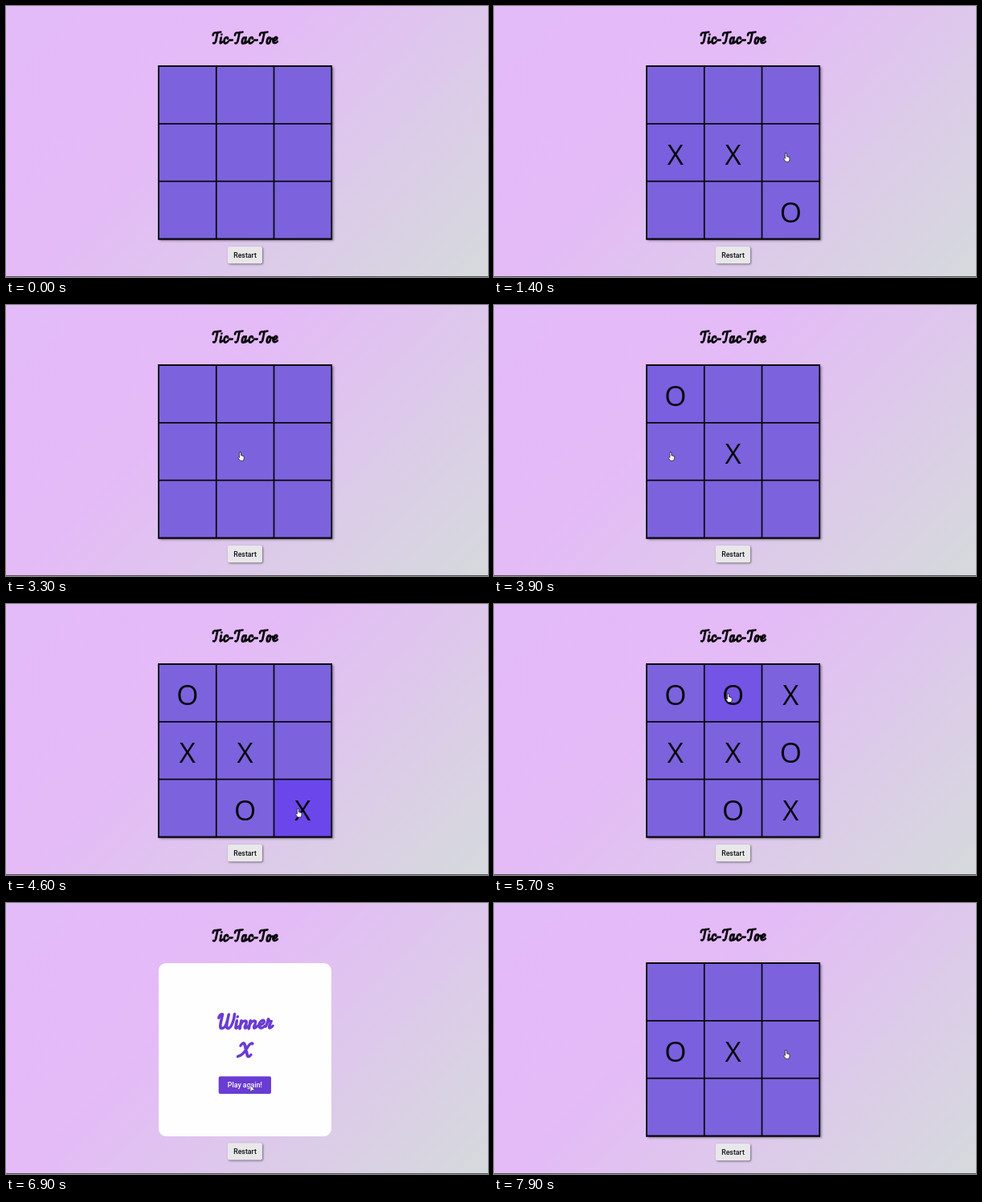
Animation of 600x338 px, one loop 8 s. Source, as an HTML page with a canvas:

```html
<!DOCTYPE html>
<html lang="en">
<head>
<meta charset="utf-8">
<title>Tic-Tac-Toe</title>
<style>
html, body { margin: 0; width: 100%; height: 100%; overflow: hidden; }
canvas { display: block; width: 600px; height: 338px; }
</style>
</head>
<body>
<canvas id="stage" width="600" height="338" role="img" aria-label="Tic-Tac-Toe game"></canvas>
<script>
const ctx = document.getElementById('stage').getContext('2d');
const LOOP = 8000, STEP = 100;
const BEAT = 320, REPLAY = 200, FLASH = 300, ENTER = 300;
const LEFT = 190, TOP = 75, PITCH = 71.75;
const INK = '#08060c', VIOLET = '#693cd3';

// Brush lettering: upright centre lines on a 100-unit em, slanted when drawn
const ring = (x, y, rx, ry) => `M${x - rx} ${y}a${rx} ${ry} 0 1 1 ${2 * rx} 0a${rx} ${ry} 0 1 1 ${-2 * rx} 0`;
const BOWL = ring(17, -21, 11, 21);
const GLYPHS = {
  T: 'M2-58Q0-76 16-75T50-79M30-76L28-14Q26 0 14-4',
  i: 'M8-62h.1M8-42V-12Q9 6 24-12',
  c: 'M28-34C22-50 4-44 6-20S24 2 34-13',
  '-': 'M4-24H24',
  a: BOWL + 'M28-42V-12Q30 4 44-14',
  o: BOWL + 'M24-36Q32-28 40-34',
  e: 'M6-18C44-24 28-56 12-38S14 12 36-13',
  W: 'M-2-56Q-2-78 14-74C14-40 6-2 24-2S46-40 46-74C46-40 40-2 56-2S80-50 76-76',
  n: 'M4 0V-42M4-20Q14-44 26-40T28-12Q30 6 46-14',
  r: 'M4-12Q12-36 10-50Q18-36 28-38L22-14Q24 6 40-14',
  X: 'M4-60Q14-84 26-62L46-14Q54 6 66-12M64-70Q52-78 38-44T0-4',
  O: ring(27, -34, 23, 32)
};
const ADVANCE = { T: 52, i: 27, c: 37, '-': 34, a: 47, o: 42, e: 38, W: 86, n: 47, r: 38 };

const HAND = new Path2D('M-1 0H1V4L4.6 5V8L3.8 10.6H-.2L-2.8 7L-2 6L-1 6.7Z');
const ARROW = new Path2D('M0 0V8.4L2.2 6.5L5.6 6.3Z');

// One cell per beat; X opens and marks alternate
const GAMES = [[500, '483562'], [3320, '403785216'], [7310, '435']].map(([first, cells], i) => ({
  start: i ? first - REPLAY : 0,
  end: first + BEAT * (cells.length - 1),
  moves: [...cells].map((cell, k) => ({ cell: +cell, at: first + BEAT * k, mark: 'XO'[k % 2] }))
}));

const corner = cell => [LEFT + cell % 3 * PITCH, TOP + Math.floor(cell / 3) * PITCH];

// Every click the pointer makes, beginning at the stage edge
const STOPS = [{ at: ENTER, x: 20, y: 340 }];
for (const g of GAMES) {
  if (g.start) STOPS.push({ at: g.start, x: 304, y: 227 });
  for (const m of g.moves) {
    const [x, y] = corner(m.cell);
    STOPS.push({ at: m.at, x: x + PITCH / 2 - 6, y: y + PITCH / 2 + 1 });
  }
}

const clamp = v => Math.max(0, Math.min(1, v));
const gameAt = t => GAMES.filter(g => g.start <= t).pop();

// The pointer rests after a click, then glides to the next one ahead of time
function pointer(t) {
  if (t < ENTER) return null;
  const n = STOPS.findIndex(s => s.at > t);
  if (n < 0) return STOPS[STOPS.length - 1];
  const a = STOPS[n - 1], b = STOPS[n];
  const u = clamp(((t - a.at) / (b.at - a.at) - .45) / .3), k = u * u * (3 - 2 * u);
  return { x: a.x + (b.x - a.x) * k, y: a.y + (b.y - a.y) * k };
}

const inside = (p, x, y, w, h) => p && p.x > x && p.x < x + w && p.y > y && p.y < y + h;

function shadow(offset, blur) {
  ctx.shadowColor = 'rgba(0,0,0,.5)';
  ctx.shadowOffsetX = ctx.shadowOffsetY = offset;
  ctx.shadowBlur = blur;
}

function box(x, y, w, h, r, fill) {
  ctx.fillStyle = fill;
  ctx.beginPath();
  ctx.roundRect(x, y, w, h, r);
  ctx.fill();
}

function script(text, x, y, size, color) {
  ctx.save();
  ctx.translate(x, y);
  ctx.scale(size / 100, size / 100);
  ctx.transform(1, 0, -.18, 1, 0, 0);
  ctx.strokeStyle = color;
  ctx.lineWidth = 15;
  ctx.lineCap = ctx.lineJoin = 'round';
  for (const ch of text) {
    ctx.stroke(new Path2D(GLYPHS[ch]));
    ctx.translate(ADVANCE[ch] || 0, 0);
  }
  ctx.restore();
}

function label(text, x, y, font, color) {
  ctx.font = font;
  ctx.fillStyle = color;
  ctx.fillText(text, x, y);
}

function button(text, x, y, w, h, fill, color, raised) {
  ctx.save();
  if (raised) shadow(1, 2.5);
  box(x, y, w, h, 2, fill);
  ctx.restore();
  label(text, x + w / 2, y + h / 2 + 3.2, '500 8.8px Roboto, sans-serif', color);
}

function background() {
  const g = ctx.createLinearGradient(65.5, -65.5, 534.5, 403.5);
  g.addColorStop(0, '#e3bbf8');
  g.addColorStop(.37, '#e4baf7');
  g.addColorStop(1, '#d5dadc');
  ctx.fillStyle = g;
  ctx.fillRect(0, 0, 600, 338);
  ctx.fillStyle = '#555158';
  ctx.fillRect(0, 337, 600, 1);
}

function board(game, t) {
  ctx.save();
  shadow(1.5, 3);
  box(LEFT - .9, TOP - .9, 217, 217.6, 0, INK);
  ctx.restore();
  const played = game.moves.filter(m => m.at <= t);
  for (let cell = 0; cell < 9; cell++) {
    const [x, y] = corner(cell), move = played.find(m => m.cell === cell);
    const k = move ? clamp(1 - (t - move.at) / FLASH) : 0;
    box(x + .9, y + .9, 70, 70, 0, `rgb(${124 - 17 * k},${99 - 28 * k},${221 + 14 * k})`);
    if (move) label(move.mark, x + PITCH / 2, y + 51, '35px "Open Sans", sans-serif', INK);
  }
}

function result(game, p) {
  const area = [264.7, 216.3, 65.3, 21.8];
  box(LEFT, TOP, 215, 216, 9, '#fefdff');
  script('Winner', 263, 156.8, 24, VIOLET);
  script(game.moves[game.moves.length - 1].mark, 288.5, 192.3, 24, VIOLET);
  button('Play again!', ...area, VIOLET, '#fff', !inside(p, ...area));
}

function cursor(p, hand) {
  const shape = hand ? HAND : ARROW;
  ctx.save();
  ctx.translate(p.x, p.y);
  ctx.fillStyle = '#fff';
  ctx.strokeStyle = hand ? '#25213a' : '#4a4658';
  ctx.lineWidth = .8;
  ctx.lineJoin = 'round';
  ctx.fill(shape);
  ctx.stroke(shape);
  ctx.restore();
}

function draw(t) {
  const game = gameAt(t), done = t >= game.end, p = pointer(t);
  ctx.textAlign = 'center';
  background();
  script('Tic-Tac-Toe', 255.5, done ? 47.7 : 46.9, 18.2, INK);
  button('Restart', 276, done ? 299.2 : 300, 43, 21.3, '#e8e7e9', '#111', true);
  if (done) result(game, p);
  else board(game, t);
  if (p) cursor(p, !done && inside(p, LEFT, TOP, 3 * PITCH, 3 * PITCH));
}

function tick() {
  draw(Math.floor(performance.now() % LOOP / STEP) * STEP);
  requestAnimationFrame(tick);
}
tick();
</script>
</body>
</html>
```
